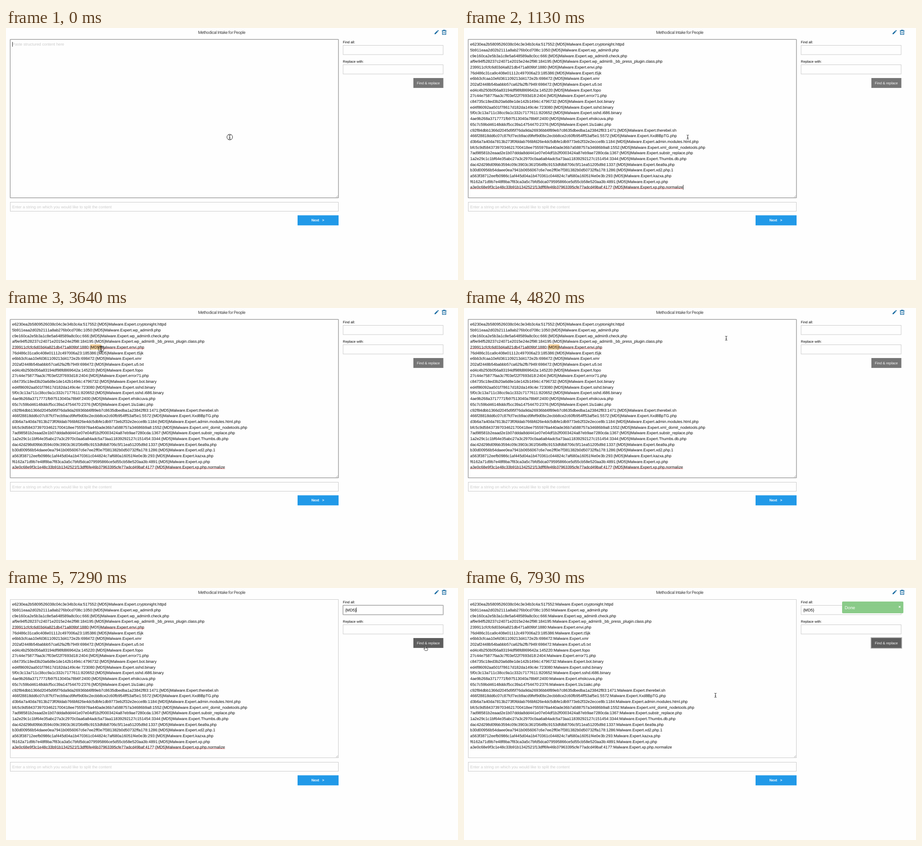
These frames come from a looping animation (1003 by 559 pixels, 8 s). An HTML page:

```html
<!DOCTYPE html>
<html lang="en">
<head>
<meta charset="utf-8">
<title>Structured text import</title>
<style>
  html, body { margin: 0; width: 100%; height: 100%; overflow: hidden; background: #fefefe; }
  svg { display: block; width: 100%; height: 100%; }
  text { font-family: "Liberation Sans", Arial, sans-serif; font-size: 8.79px; fill: #0a0a0a;
         font-kerning: none; text-rendering: geometricPrecision; white-space: pre; }
  .box { fill: #fefefe; stroke: #cacaca; stroke-width: 1; }
  .box.focus { stroke: #8a8a8a; filter: drop-shadow(0 0 1.5px #cacaca); }
  .hint { fill: #cacaca; }
  .label { font-size: 7.69px; }
  .button { font-size: 7.91px; fill: #fefefe; }
  .bold { font-weight: bold; }
  .heading { font-family: Roboto, sans-serif; font-size: 9.3px; letter-spacing: -.5px; fill: #444; }
  .icon { fill: #1468a0; }
  .squiggle { stroke: #ee3b3b; stroke-width: .9; stroke-dasharray: 2 .8; fill: none; }
  .thin { stroke: #111; stroke-width: .9; fill: none; }
  .pointer { fill: #fff; stroke: #111; stroke-width: .8; stroke-linejoin: round; }
</style>
</head>
<body>
<svg viewBox="0 0 1003 559" preserveAspectRatio="none">
  <text class="heading" x="478.5" y="12.5" text-anchor="middle">Methodical Intake for People</text>
  <path class="icon" transform="translate(949.5 3) scale(.51)"
    d="M3 17.2V21h3.8L17.8 9.9l-3.7-3.7zM20.7 7a1 1 0 0 0 0-1.4l-2.3-2.3a1 1 0 0 0-1.4 0l-1.9 1.8 3.8 3.8z"/>
  <g fill="none" stroke="#1468a0" stroke-width="1.3">
    <path d="M967 6.2H977.5M970 6V4.7H974.5V6M968.5 6.5V14.3H976V6.5"/>
    <path d="M971 8.5V12.3M973.5 8.5V12.3" stroke-width="1"/>
  </g>

  <rect id="area" class="box" x="9.5" y="25.5" width="728" height="351"/>
  <path d="M732.5 375.5L736.5 371.5M735 375.5L736.5 374" stroke="#888" stroke-width=".7"/>
  <text id="areaHint" class="hint" x="13.8" y="39.3">Paste structured content here</text>
  <rect id="selection" x="187" y="80.5" height="12" fill="#fbd6a0"/>
  <g id="pasted"></g>
  <g id="replaced"></g>
  <path id="lastSquiggle" class="squiggle" d="M14 356.6H327M331 356.6H486"/>
  <path id="clickedSquiggle" class="squiggle" d="M14 90.4H184M211 90.4H307"/>

  <rect class="box" x="9.5" y="386.5" width="728" height="20"/>
  <text class="hint" x="13.8" y="399.8">Enter a string on which you would like to split the content</text>
  <rect x="647" y="415.5" width="91" height="22.3" fill="#2199e8"/>
  <text class="button bold" x="677.8" y="429.4">Next</text>
  <text class="button bold" x="701.5" y="429.4">&gt;</text>

  <text class="label" x="747.6" y="33.7">Find all:</text>
  <rect id="field" class="box" x="748" y="38.5" width="222" height="20.5"/>
  <text id="query" x="752.7" y="51.8">{MD5}</text>
  <text class="label" x="747.6" y="76.7">Replace with:</text>
  <rect class="box" x="748" y="81.5" width="222" height="20.5"/>
  <rect id="ring" x="903.3" y="110.3" width="67.9" height="23.2" fill="none" stroke="#aaa" stroke-width="1.8"/>
  <rect id="button" x="904" y="111" width="66.5" height="21.9"/>
  <text class="button" x="911.7" y="124.5">Find &amp; replace</text>

  <g id="toast">
    <rect x="839" y="30" width="136" height="26" rx="2" fill="#84c983"/>
    <text x="844.8" y="46.6" style="font-size:9.7px;fill:#fff">Done</text>
    <path d="M964.8 39.8L968.6 43.6M968.6 39.8L964.8 43.6" stroke="#fff" stroke-width="1.1"/>
  </g>

  <path id="caret" class="thin" d="M0 0V10.5"/>
  <g id="cursor">
    <circle id="press" class="thin" r="6.3"/>
    <path id="beam" class="thin" d="M-2.3 -4.6Q0 -4.6 0 -3.4Q0 -4.6 2.3 -4.6M0 -3.5V3.5M-2.3 4.6Q0 4.6 0 3.4Q0 4.6 2.3 4.6M-1.2 1.3H1.2"/>
    <path id="arrow" class="pointer" d="M-2 -5V4L0 2.2L1.4 5.4L2.8 4.8L1.5 1.8H4.2Z"/>
    <path id="hand" class="pointer" d="M-2 -4.4Q-1 -5.4 -.2 -4.4V-1.2L3.6 -.4Q4.8 0 4.5 1.5L3.4 4.8H-1.6L-4.3 1Q-4.4 -.4 -3 0L-2 1Z"/>
  </g>
</svg>
<script>
const rows = `e6230ea2b5809526038c04c3e34b3c4a:517552 cryptonight.httpd
5b911eaa2d02b2111a8ab276b0cd708c:1050 wp_admin9.php
c9e160ca2e5b3a1c8e5a648589a8c0cc:666 wp_admin9.check.php
af9e94f528237c24071e2015e24e2f98:184195 wp_admin9._bb_press_plugin.class.php
239911cfcfc6d03d4a821db471a809bf:1880 envi.php
76d486c31ca9c408e01112c497006a23:185386 tSjk
e6bb3cfcaa10efd361109213d4172e2b:698472 xmr
202af2448b54babbb57ca62fa2fb7949:698472 u5.txt
ed4c4b250b056a83194df98fd869642a:145220 fopo
27c44e75877faa3c7f03ef22f7693d18:2404 error71.php
c84735c18ed3b20a6d8e1de142b1494c:4796732 bot.binary
ed4f86092aa501f78617d182da149c4e:723080 sshd.binary
5f0c3c13a711c38cc9a1c332c7177611:820652 sshd.i686.binary
4ae9b268a3717771fb97513040a78b6f:2400 ehskcuva.php
65c7c59bd46148ddcf5cc39a14754470:2376 1lu1iakc.php
c92f84dbb1366d2045d95f76da9da26936bb6f89eb7c8635dbedba1a23842f83:1471 therebel.sh
466f28818dd6c07c87fcf7ecb9acd9fef9d0bc2ecbb8ce2c60fb954ff53af5e1:5572 Xxd8BpTG.php
d3b6a7a40da7813b273f0fddab766bfd26e4dc5dbfe1db9773eb2f32e2ecce8b:1184 admin.modules.html.php
bfc5c9d58437397034621700418ee7555978a440ade36b7a588757a34686b9a8:1552 xml_domit_nodetools.php
7ad98581b2eaad2e1b07ddda8dd441e07e04df1b2f0003424a87eb9ae7280cda:1367 substr_replace.php
1a2e29c1c1bf64e35abc27a3c2970c0aa6a84adc5a73aa11839292127c151454:3344 Thumbs.db.php
dac42d298d09bb3594c09c3903c361f364f8c9153dfdb8706c5f11ea51205d9d:1337 6ea9a.php
b30d00956b54daee0ea7941b0656067c6e7ee2ff0e7f381382b0d50732ffa178:1286 xd2.php.1
a563f38712eefb0986c1af445d04a1b470361c044824c7af680a16051f4e0e3b:293 kazxa.php
f6162a71d9b7e48f8ba7f83ca3a5c7bfd5dca079595866ce5d55cb58e520aa3b:4891 xp.php
a3e0c68e9f3c1e48c33b91b1342521f13dff6fe46b37963395cfe77adcd49baf:4177 xp.php.normalize`.split("\n");

const el = {};
document.querySelectorAll("[id]").forEach(node => el[node.id] = node);

function fillList(group, tag) {
  rows.forEach((row, i) => {
    const line = document.createElementNS("http://www.w3.org/2000/svg", "text");
    line.setAttribute("x", 13.8);
    line.setAttribute("y", 39.3 + i * 12.68);
    line.textContent = row.replace(" ", `:${tag}Malware.Expert.`);
    group.append(line);
  });
}
fillList(el.pasted, "{MD5}");
fillList(el.replaced, "");

const LOOP = 8000, PASTE = 1130, FOCUS = 5560, FILL = 6390, HOVER = 7290, REPLACE = 7580;

// Cursor moves: start time, step length, step count, end point.
const moves = [
  [1730, 146, 8, 178, 81],
  [2900, 1, 1, 185, 84.5],
  [3050, 148, 5, 211, 90.5],
  [3940, 1, 1, 210, 90],
  [4230, 148.6, 8, 754, 56.5],
  [FOCUS, 1, 1, 757, 54],
  [6690, 150, 5, 931.5, 134],
  [7780, 150, 2, 558, 238]
];
// Caret: on, off, x, y.
const carets = [
  [0, 390, 14.4, 31], [830, PASTE, 14.4, 31],
  [PASTE, 1730, 486.4, 348], [2230, 2730, 486.4, 348],
  [FOCUS, 6220, 753.4, 43.3],
  [FILL, 6840, 777.4, 43.3], [HOVER, REPLACE, 777.4, 43.3]
];
const presses = [[0, 150], [3050, 3940], [FOCUS, 5710], [7430, REPLACE]];
const tagEdges = [0, 2.9, 10.3, 16.6, 21.5, 24.4];

const within = (t, [from, to]) => t >= from && t < to;
const show = (node, on) => node.setAttribute("visibility", on ? "visible" : "hidden");
const moveTo = (node, x, y) => node.setAttribute("transform", `translate(${x} ${y})`);

function cursorAt(t) {
  let x = 496.5, y = 242;
  for (const [start, step, count, endX, endY] of moves) {
    if (t < start) break;
    const u = Math.min(count, Math.floor((t - start) / step + 1.05)) / count;
    const eased = u * u * (3 - 2 * u);
    x += (endX - x) * eased;
    y += (endY - y) * eased;
  }
  return [x, y];
}

function draw(t) {
  const [x, y] = cursorAt(t);
  const overButton = x > 904 && y > 111 && y < 133;
  const hand = overButton || within(t, [HOVER, 7780]);
  const arrow = !hand && x > 738 && (x < 748 || (y > 59 && y < 81) || y > 102);
  moveTo(el.cursor, x, y);
  show(el.hand, hand);
  show(el.arrow, arrow);
  show(el.beam, !hand && !arrow);
  show(el.press, presses.some(span => within(t, span)));

  const caret = carets.find(span => within(t, span));
  show(el.caret, caret);
  if (caret) moveTo(el.caret, caret[2], caret[3]);

  show(el.areaHint, t < PASTE);
  show(el.pasted, within(t, [PASTE, REPLACE]));
  show(el.replaced, t >= REPLACE);
  show(el.lastSquiggle, within(t, [PASTE, REPLACE]));
  show(el.clickedSquiggle, within(t, [3050, REPLACE]));

  const reach = t >= 3640 ? 24.4 : x - 187;
  show(el.selection, within(t, [3050, FOCUS]));
  el.selection.setAttribute("width", Math.max(0, ...tagEdges.filter(edge => edge <= reach)));

  el.area.classList.toggle("focus", t < FOCUS);
  el.field.classList.toggle("focus", within(t, [FOCUS, REPLACE]));
  show(el.query, t >= FILL);
  el.button.setAttribute("fill", overButton || t >= HOVER ? "#5e5e5e" : "#767676");
  show(el.ring, t >= REPLACE);
  el.toast.setAttribute("opacity", t < 7780 ? 0 : t < 7930 ? .5 : .95);
}

function tick() {
  draw(performance.now() % LOOP);
  requestAnimationFrame(tick);
}
tick();
</script>
</body>
</html>
```
